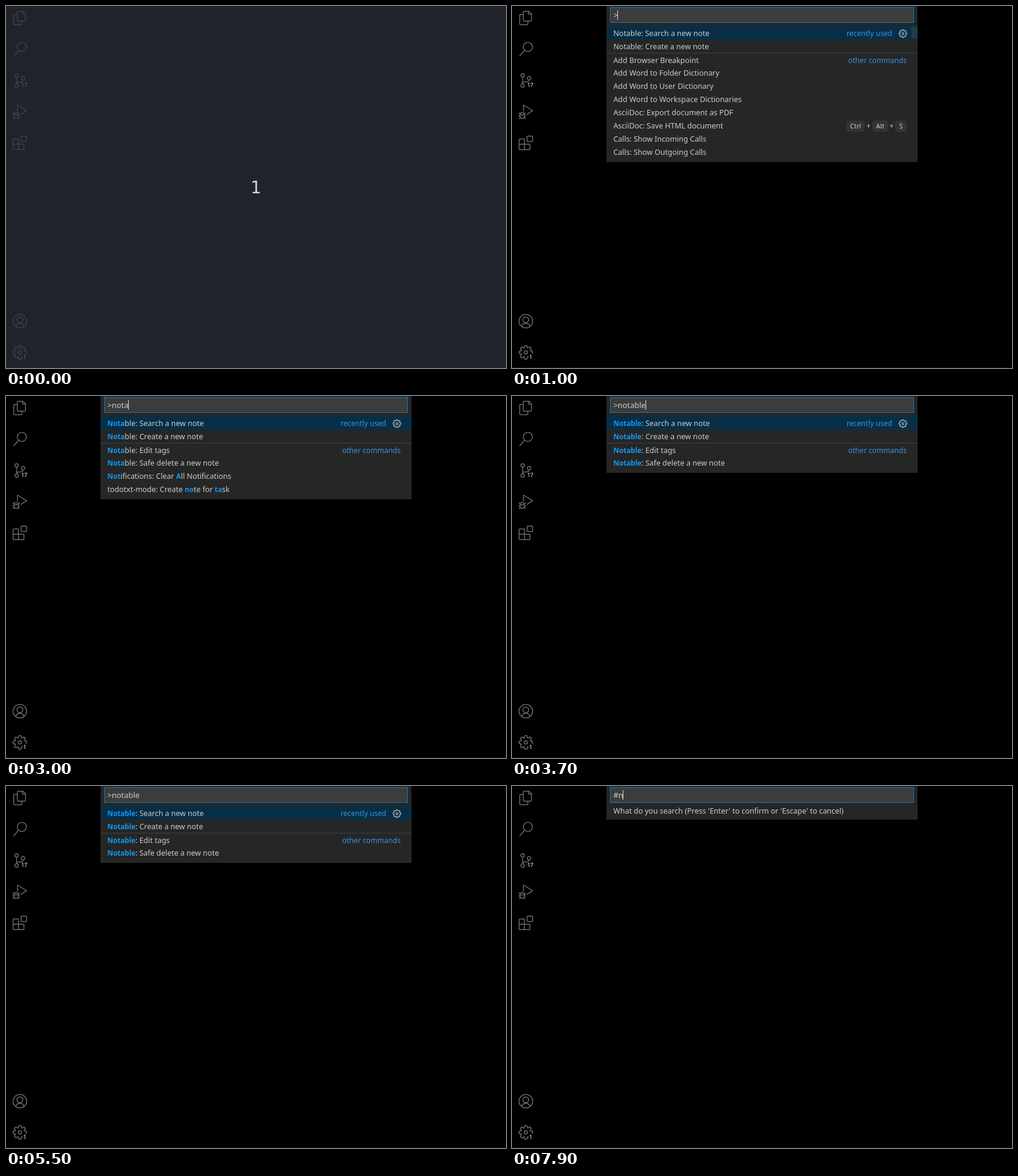
An HTML page with a canvas that plays this animation: 831 by 603 pixels, repeating every 8000 ms.

```html
<!DOCTYPE html>
<html lang="en">
<head>
<meta charset="utf-8">
<title>Command palette</title>
<style>
html, body { margin: 0; width: 100%; height: 100%; overflow: hidden; background: #000; }
canvas { display: block; }
</style>
</head>
<body>
<canvas id="stage" width="831" height="603"></canvas>
<script>
const ctx = document.getElementById('stage').getContext('2d');
const LOOP = 8000;
const FONT = '"Noto Sans", "Open Sans", sans-serif';
const ICON = '#6c6c6c';
const TEXT = '#cccccc';
const LINK = '#3a92e2';
const LEFT = 168.4;
const ROW_SIZE = 12.45;

const SEARCH = 'Notable: Search a new note';
const CREATE = 'Notable: Create a new note';
const EDIT = 'Notable: Edit tags';
const REMOVE = 'Notable: Safe delete a new note';

const allRows = [
  SEARCH, CREATE,
  'Add Browser Breakpoint',
  'Add Word to Folder Dictionary',
  'Add Word to User Dictionary',
  'Add Word to Workspace Dictionaries',
  'AsciiDoc: Export document as PDF',
  'AsciiDoc: Save HTML document',
  'Calls: Show Incoming Calls',
  'Calls: Show Outgoing Calls'
];
const noteRows = [
  SEARCH, CREATE,
  'Help: Show Release Notes',
  EDIT, REMOVE,
  'Notifications: Clear All Notifications',
  'Notifications: Focus Notification Toast',
  'Notifications: Hide Notifications',
  'Notifications: Show Notifications',
  'todotxt-mode: Create note for task'
];
// Brackets mark matches that are split over several words.
const notaRows = [
  SEARCH, CREATE, EDIT, REMOVE,
  '[Not]ifications: Clear [A]ll Notifications',
  'todotxt-mode: Create [no]te for [ta]sk'
];
const notableRows = [SEARCH, CREATE, EDIT, REMOVE];

// start time, typed query, rows, scroll thumb height
const typing = [
  [800, '', allRows, 20],
  [2300, 'n', allRows, 20],
  [2600, 'no', noteRows, 34],
  [2800, 'not', noteRows, 150],
  [3000, 'nota', notaRows, 0],
  [3200, 'notab', notableRows, 0],
  [3400, 'notabl', notableRows, 0],
  [3500, 'notable', notableRows, 0]
];
const caretOff = [[1300, 1800], [3500, 3700], [4400, 4900], [5500, 6000], [6700, 7300]];

const clamp = v => Math.max(0, Math.min(1, v));
const within = (t, a, b) => t >= a && t < b;

function box(x, y, w, h, color) {
  ctx.fillStyle = color;
  ctx.fillRect(x, y, w, h);
}

function say(text, x, y, size, color, align = 'left', weight = 400) {
  ctx.font = `${weight} ${size}px ${FONT}`;
  ctx.textAlign = align;
  ctx.fillStyle = color;
  ctx.fillText(text, x, y);
  return ctx.measureText(text).width;
}

// Eight flat teeth with pointed notches between them.
function gear(cx, cy, r, hole, color, line) {
  ctx.beginPath();
  for (let i = 0; i < 8; i++) {
    const mid = i * Math.PI / 4;
    [[-0.155, r], [0.155, r], [Math.PI / 8, r * 0.68]].forEach(([d, len]) =>
      ctx.lineTo(cx + len * Math.cos(mid + d), cy + len * Math.sin(mid + d)));
  }
  ctx.closePath();
  ctx.moveTo(cx + hole, cy);
  ctx.arc(cx, cy, hole, 0, 7);
  ctx.strokeStyle = color;
  ctx.lineWidth = line;
  ctx.stroke();
}

const ring = (x, y, r) => `M${x - r} ${y}a${r} ${r} 0 1 0 ${2 * r} 0a${r} ${r} 0 1 0 ${-2 * r} 0`;

const icons = new Path2D([
  // files
  'M20.2 8.8H28L32.4 13V23.8Q32.4 25.2 31 25.2H20.2Q18.8 25.2 18.8 23.8V10.2Q18.8 8.8 20.2 8.8Z',
  'M27.4 9V13.6H32.4M18.8 14.2H14.2Q12.8 14.2 12.8 15.6V29.8Q12.8 31.2 14.2 31.2H25Q26.4 31.2 26.4 29.8V25.2',
  // search
  ring(26.4, 68.2, 7.6), 'M21 73.8L12.6 83.2',
  // source control
  ring(17.6, 115.6, 2.9), ring(17.6, 132.4, 2.9), ring(28.4, 120.2, 2.9),
  'M17.6 118.5V129.5M28.4 123.1Q28 126.4 24.6 126.4H20.6Q17.9 126.6 17.6 129.5',
  // run and debug
  'M19.2 175.4V165L34.3 174.4L24.4 180.8',
  'M13.4 180.6Q13.4 177.4 17 177.4Q20.6 177.4 20.6 180.6V183.4Q20.6 187.2 17 187.2Q13.4 187.2 13.4 183.4Z',
  'M13.4 181.2H20.6M13.4 179.8L11.4 177.9M20.6 179.8L22.6 177.9M13.4 183H11M20.6 183H23M13.8 185.6L11.6 187.6M20.2 185.6L22.4 187.6',
  // extensions
  'M12.8 221.4H20.6V230.2H28.8Q29.8 230.2 29.8 231.2V238.2Q29.8 239.2 28.8 239.2H12.8Q11.8 239.2 11.8 238.2V222.4Q11.8 221.4 12.8 221.4Z',
  'M11.8 230.2H20.6V239.2M26.2 216.8H33.2Q34.3 216.8 34.3 217.9V224.7Q34.3 225.8 33.2 225.8H26.2Q25.1 225.8 25.1 224.7V217.9Q25.1 216.8 26.2 216.8Z',
  // account
  ring(23, 525, 11.3), ring(23, 522.7, 4.8), 'M16.2 533.8A7 7 0 0 1 29.8 533.8'
].join(''));

function sidebar() {
  ctx.strokeStyle = ICON;
  ctx.lineWidth = 1.45;
  ctx.lineJoin = 'round';
  ctx.stroke(icons);
  gear(23, 577, 11.3, 2.7, ICON, 1.45);
  box(24.5, 127.3, 12, 11, '#000');
  say('17', 30.3, 135, 9, '#fff', 'center');
  box(27.5, 579, 9, 12, '#000');
  say('1', 31, 588, 9, '#fff', 'center');
  box(0, 602, 831, 1, '#120d18');
}

function countdown() {
  box(0, 0, 831, 603, 'rgba(44,48,57,0.73)');
  ctx.font = '28px "DejaVu Sans", sans-serif';
  ctx.textAlign = 'center';
  ctx.fillStyle = '#d3d7d3';
  ctx.fillText('1', 415.5, 312);
}

function panel(bottom, text, hint, caret) {
  box(157, 0, 517, bottom, '#252626');
  box(163, 2, 505, 26, '#0a80be');
  box(164, 3, 503, 24, '#3c3c3c');
  if (hint) say(hint, LEFT, 20, 12.5, '#858585');
  const w = say(text, LEFT, 20, 12.95, TEXT);
  if (caret) box(Math.floor(LEFT + w), 7, 1, 16, '#dcdcdc');
}

function split(text, query) {
  if (text.includes('[')) return text.split(/[\[\]]/);
  const at = query ? text.toLowerCase().indexOf(query) : -1;
  if (at < 0) return [text];
  const end = at + query.length;
  return [text.slice(0, at), text.slice(at, end), text.slice(end)];
}

function label(text, query, y) {
  let x = LEFT;
  split(text, query).forEach((part, i) => {
    x += i % 2
      ? say(part, x, y, 11.7, '#1297f0', 'left', 700)
      : say(part, x, y, ROW_SIZE, TEXT);
  });
}

function keys(y) {
  [['Ctrl', 556, 30], ['Alt', 599, 26], ['S', 637, 19]].forEach(([name, x, w]) => {
    ctx.beginPath();
    ctx.roundRect(x + 0.5, y - 12.5, w - 1, 17, 3);
    ctx.fillStyle = '#323434';
    ctx.fill();
    ctx.strokeStyle = '#393b3b';
    ctx.lineWidth = 1;
    ctx.stroke();
    say(name, x + w / 2, y, 11, TEXT, 'center');
  });
  say('+', 592.5, y, 12, TEXT, 'center');
  say('+', 631, y, 12, TEXT, 'center');
}

function thumbAlpha(t) {
  return t < 2200
    ? Math.min(clamp((t - 900) / 200), clamp((2100 - t) / 800))
    : clamp((t - 2300) / 200);
}

function palette(t, caret) {
  const [, query, rows, thumb] = typing.filter(s => s[0] <= t).pop();
  const chosen = within(t, 4300, 4800) ? 1 : 0;
  panel(40 + 22 * rows.length, '>' + query, '', caret);
  box(157, 34 + 22 * chosen, 517, 22, '#062f47');
  box(157, 78, 517, 1, '#3f4144');
  rows.forEach((row, i) => {
    const y = 50 + 22 * i + (i === 2 ? 1 : 0);
    label(row, query, y);
    if (row.endsWith('HTML document')) keys(y);
  });
  say('recently used', chosen ? 656 : 632, 50, 12.1, LINK, 'right');
  say('other commands', 656, 95, 12.1, LINK, 'right');
  gear(649.7, 46 + 22 * chosen, 6.6, 1.6, '#c5c5c5', 1.05);
  if (thumb) box(664, 34, 10, thumb, `rgba(121,121,121,${0.4 * thumbAlpha(t)})`);
}

function prompt(t, caret) {
  const text = t < 7500 ? '' : t < 7900 ? '#' : '#n';
  panel(56, text, text ? '' : 'Search notes', caret);
  say("What do you search (Press 'Enter' to confirm or 'Escape' to cancel)", LEFT, 46, ROW_SIZE, TEXT);
}

function draw(t) {
  box(0, 0, 831, 603, '#000');
  sidebar();
  const caret = !caretOff.some(([a, b]) => within(t, a, b));
  if (t < 100) countdown();
  else if (within(t, 800, 6000)) palette(t, caret);
  else if (t >= 6000) prompt(t, caret);
}

const start = performance.now();
function tick() {
  const t = (performance.now() - start) % LOOP;
  draw(Math.floor(t / 100) * 100);
  requestAnimationFrame(tick);
}
tick();
</script>
</body>
</html>
```
